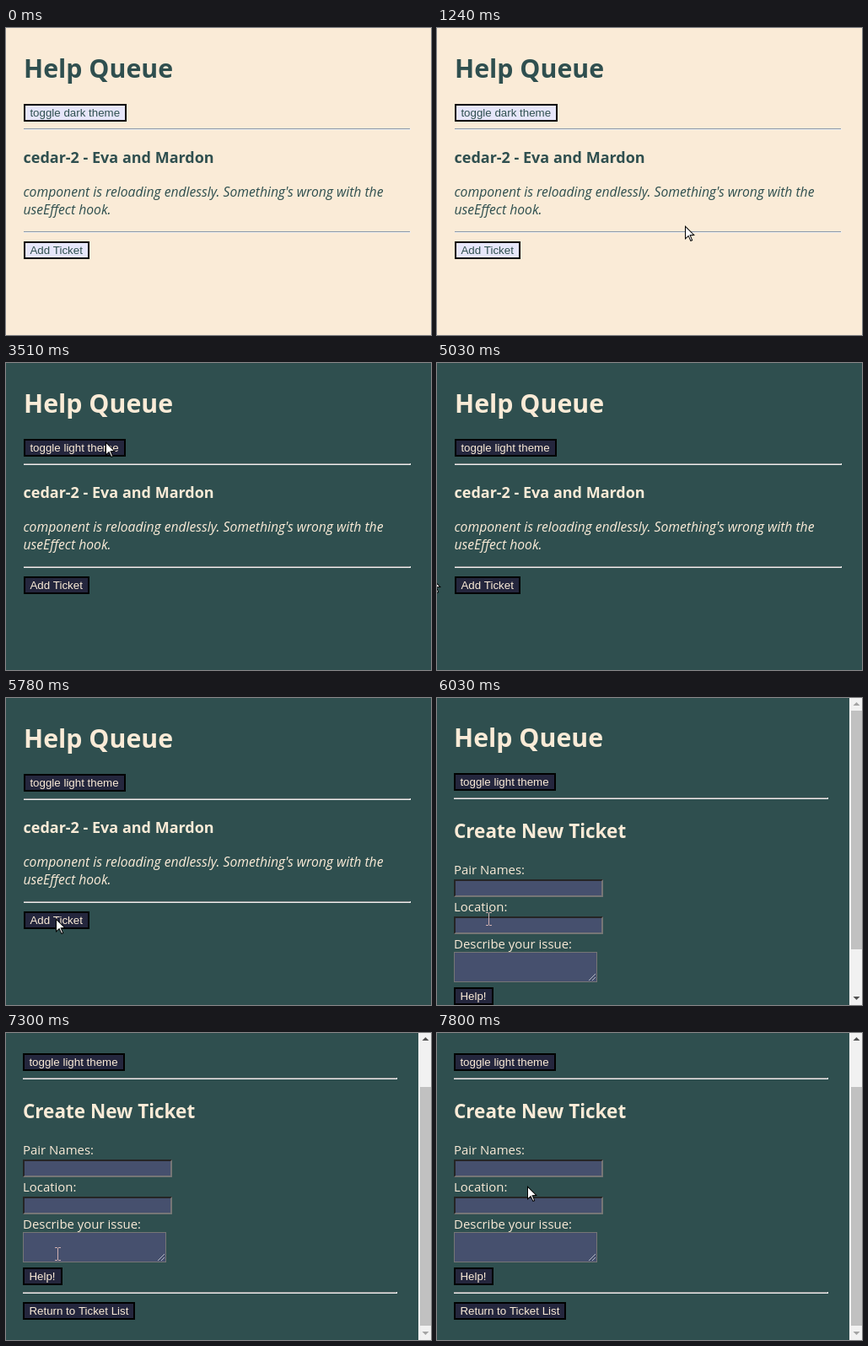
Recreate the animation shown at these times as an HTML page with a canvas. Size 504 by 364 pixels, loop 8 s.

```html
<!DOCTYPE html>
<html lang="en">
<head>
<meta charset="utf-8">
<title>Help Queue</title>
<style>
  html, body { margin: 0; width: 100%; height: 100%; overflow: hidden; }
  canvas { display: block; }
</style>
</head>
<body>
<canvas id="stage" width="504" height="364"></canvas>
<script>
const ctx = document.getElementById('stage').getContext('2d');
const WIDTH = 504, HEIGHT = 364, LOOP = 8000;
const SANS = '"Open Sans", "Noto Sans", sans-serif';
const FONTS = {
  title: `bold 30.3px ${SANS}`,
  form: `bold 22.5px ${SANS}`,
  ticket: `bold 18px ${SANS}`,
  issue: `italic 15.75px ${SANS}`,
  label: `14.95px ${SANS}`,
  button: '13.333px "Liberation Sans", Arial, sans-serif'
};
const LIGHT = { page: '#faebd7', ink: '#2f4f4f', button: '#e6e6fa', ruleTop: '#8c9aaa', ruleBottom: '#eeeeee' };
const DARK = { page: '#2f4f4f', ink: '#faebd7', button: '#24263d', ruleTop: '#9a9a9a', ruleBottom: '#eeeeee' };
const FIELD = '#46506e';

const THEME_TIME = 3510, FORM_TIME = 6030;
// [start time, x, y, shape]; the pointer jumps between these spots
const POINTER = [
  [0, 0, 0, null],
  [990, 320, 269, arrow],
  [1240, 294, 234, arrow],
  [2010, 293, 234, arrow],
  [2260, 171, 134, arrow],
  [2510, 129, 117, arrow],
  [2760, 118, 98, arrow],
  [3010, 118, 93, arrow],
  [5030, -7, 254, arrow],
  [5280, 69, 309, arrow],
  [5530, 64, 264, arrow],
  [5780, 59, 261, arrow],
  [6030, 58, 254, textBeam],
  [7800, 107, 181, arrow]
];
const SCROLL = [[0, 0], [7030, 43], [7300, 65]];
const MAX_SCROLL = 65;

let theme = LIGHT;

const stepAt = (steps, t) => steps.filter(step => step[0] <= t).pop();

function box(x, y, w, h, color) {
  ctx.fillStyle = color;
  ctx.fillRect(x, y, w, h);
}

function text(font, string, x, baseline) {
  ctx.font = FONTS[font];
  ctx.fillStyle = theme.ink;
  ctx.fillText(string, x, baseline);
}

function polygon(points, color) {
  ctx.beginPath();
  points.forEach(([x, y]) => ctx.lineTo(x, y));
  ctx.closePath();
  ctx.fillStyle = color;
  ctx.fill();
}

function button(label, x, y, w) {
  box(x, y, w, 21, '#000');
  box(x + 2, y + 2, w - 4, 17, theme.button);
  text('button', label, x + 7.4, y + 15);
}

function rule(x, y, w) {
  box(x, y, w, 2, theme.ruleBottom);
  box(x, y, w - 1, 1, theme.ruleTop);
}

function input(x, y) {
  box(x, y, 177, 21, '#767676');
  polygon([[x, y], [x + 177, y], [x + 175, y + 2], [x + 2, y + 19], [x, y + 21]], '#252525');
  box(x + 2, y + 2, 173, 17, FIELD);
}

function textarea(x, y) {
  box(x, y, 170, 36, '#767676');
  box(x + 1, y + 1, 168, 34, FIELD);
  ctx.strokeStyle = '#b4b8c4';
  ctx.lineWidth = 1;
  ctx.beginPath();
  for (const size of [7, 3]) {
    ctx.moveTo(x + 167 - size, y + 34);
    ctx.lineTo(x + 168, y + 33 - size);
  }
  ctx.stroke();
}

function header(x, y, ruleWidth) {
  text('title', 'Help Queue', x, y + 59);
  if (theme === DARK) button('toggle light theme', x, y + 90, 121);
  else button('toggle dark theme', x, y + 90, 122);
  rule(x, y + 119, ruleWidth);
}

function ticketList() {
  header(21, 0, 459);
  text('ticket', 'cedar-2 - Eva and Mardon', 20.5, 160);
  text('issue', "component is reloading endlessly. Something's wrong with the", 20.5, 200);
  text('issue', 'useEffect hook.', 20.5, 221);
  rule(21, 241, 459);
  button('Add Ticket', 21, 253, 78);
}

function ticketForm() {
  header(20, -1, 444);
  text('form', 'Create New Ticket', 20, 166);
  text('label', 'Pair Names:', 20, 209);
  input(20, 215);
  text('label', 'Location:', 20, 253);
  input(20, 259);
  text('label', 'Describe your issue:', 20, 297);
  textarea(20, 301);
  button('Help!', 20, 343, 47);
  rule(20, 372, 444);
  button('Return to Ticket List', 20, 384, 133);
}

function scrollbar(scroll) {
  const arrowColor = enabled => enabled ? '#505050' : '#a3a3a3';
  box(489, 0, 15, HEIGHT, '#f1f1f1');
  box(491, Math.round(15 + scroll * 0.76), 13, 283, '#c1c1c1');
  polygon([[493.5, 9], [497.5, 5], [501.5, 9]], arrowColor(scroll > 0));
  polygon([[493.5, 354], [497.5, 358], [501.5, 354]], arrowColor(scroll < MAX_SCROLL));
}

function arrow(x, y) {
  const outline = [[0, 0], [0, 17], [4, 13.3], [6.6, 19], [9.3, 17.9], [6.9, 12.2], [12, 12]];
  const inside = [[1, 2.4], [1, 14.7], [4.3, 11.7], [7.1, 17.7], [8, 17.3], [5.4, 11.2], [9.7, 11.1]];
  const place = points => points.map(([px, py]) => [x + px, y + py]);
  polygon(place(outline), '#000');
  polygon(place(inside), '#fff');
}

function textBeam(x, y) {
  const color = '#d0b0b0';
  box(x, y, 3, 1, color);
  box(x + 4, y, 3, 1, color);
  box(x + 3, y + 1, 1, 14, color);
  box(x, y + 15, 3, 1, color);
  box(x + 4, y + 15, 3, 1, color);
}

function draw(now) {
  const t = now % LOOP;
  theme = t < THEME_TIME ? LIGHT : DARK;
  box(0, 0, WIDTH, HEIGHT, theme.page);
  if (t < FORM_TIME) {
    ticketList();
  } else {
    const scroll = stepAt(SCROLL, t)[1];
    ctx.save();
    ctx.translate(0, -scroll);
    ticketForm();
    ctx.restore();
    scrollbar(scroll);
  }
  const [, x, y, shape] = stepAt(POINTER, t);
  if (shape) shape(x, y);
}

const start = performance.now();
function tick() {
  draw(performance.now() - start);
  requestAnimationFrame(tick);
}
tick();
</script>
</body>
</html>
```
